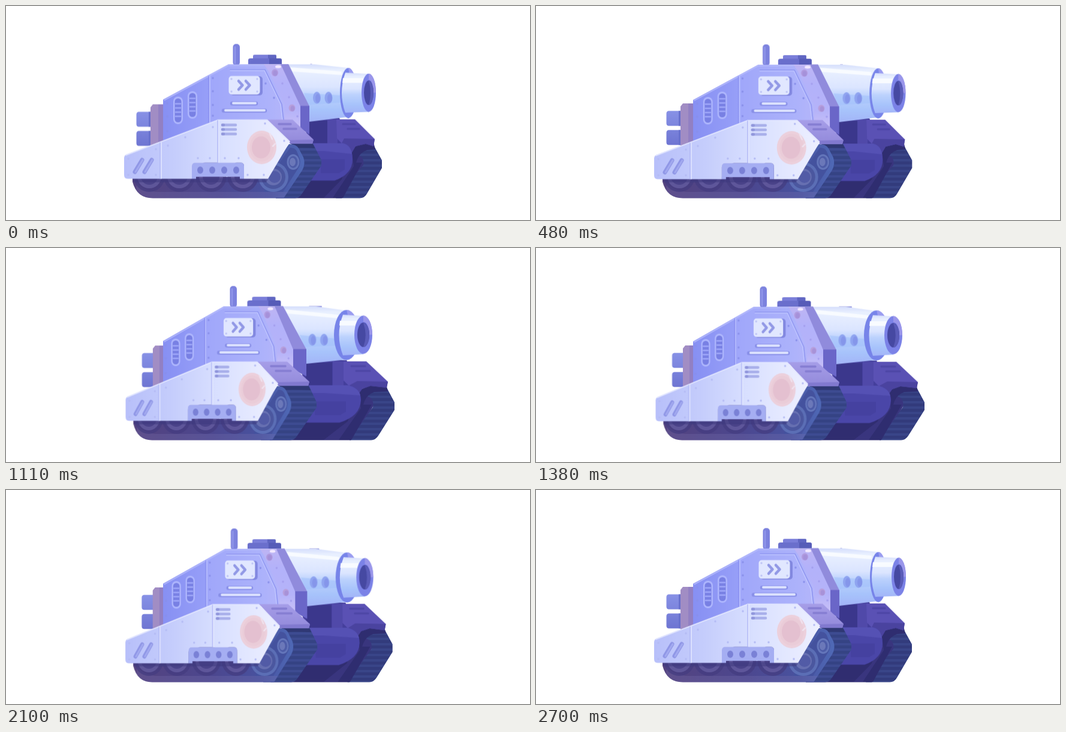
Recreate the animation shown at these times as an HTML page without scripts. Size 874x358 px, loop 2730 ms.

```html
<!DOCTYPE html>
<html lang="en">
<head>
<meta charset="utf-8">
<title>Tank</title>
<style>
html, body { margin: 0; width: 100%; height: 100%; overflow: hidden; background: #fff; }
svg { display: block; width: 874px; height: 358px; }

/* --a / --b are the two poses of a shape, --t is the turned pose of a group */
.morph { d: var(--a); animation: morph 2730ms cubic-bezier(.4, 0, .6, 1) var(--lag, 0s) infinite; }
.turn { animation: turn 2730ms cubic-bezier(.4, 0, .6, 1) var(--lag, 0s) infinite; }
.bob { animation: bob 182ms ease-in-out infinite; }
.shake { animation: shake 182ms ease-in-out infinite; }

/* the turret leads the turn, the exhausts trail it */
.lead { --lag: -70ms; }
.trail { --lag: -2660ms; }

@keyframes morph {
  0%, 15.4%, 97%, 100% { d: var(--a); }
  41%, 69.6% { d: var(--b); }
}
@keyframes turn {
  0%, 15.4%, 97%, 100% { transform: none; }
  41%, 69.6% { transform: var(--t); }
}
@keyframes bob {
  0%, 100% { transform: translateY(-.5px); }
  50% { transform: translateY(.4px); }
}
@keyframes shake {
  0%, 100% { transform: translateY(1.5px); }
  18% { transform: translateY(-.5px); }
  60% { transform: translateY(0); }
  88% { transform: translateY(-1px); }
}
.side { --t: translateX(18.5px) scaleX(.919); }
.line { fill: none; stroke-linecap: round; stroke-linejoin: round; }
</style>
</head>
<body>
<svg viewBox="0 0 874 358">
<defs>
  <linearGradient id="hull">
    <stop offset="0" stop-color="#8790f3"/><stop offset=".33" stop-color="#979ff8"/>
    <stop offset=".34" stop-color="#a0a7fa"/><stop offset=".75" stop-color="#acb2fb"/>
    <stop offset="1" stop-color="#bbb8fa"/>
  </linearGradient>
  <linearGradient id="skirt">
    <stop offset="0" stop-color="#b8c0fa"/><stop offset=".3" stop-color="#c5cdfc"/>
    <stop offset=".6" stop-color="#d9e0ff"/><stop offset="1" stop-color="#eef0ff"/>
  </linearGradient>
  <linearGradient id="track">
    <stop offset="0" stop-color="#54437f"/><stop offset=".5" stop-color="#4c478f"/>
    <stop offset=".8" stop-color="#48529f"/><stop offset="1" stop-color="#4f69b6"/>
  </linearGradient>
  <linearGradient id="barrel" x2="0" y2="1">
    <stop offset="0" stop-color="#d6dffc"/><stop offset=".1" stop-color="#e9f0ff"/>
    <stop offset=".4" stop-color="#dbe5ff"/><stop offset=".55" stop-color="#bcd2fd"/>
    <stop offset=".8" stop-color="#a7c3fb"/><stop offset="1" stop-color="#a3b5f8"/>
  </linearGradient>
  <linearGradient id="facet" x2="0" y2="1">
    <stop offset="0" stop-color="#beb5f4"/><stop offset=".3" stop-color="#b3b2fa"/>
    <stop offset=".7" stop-color="#b5b3f9"/><stop offset="1" stop-color="#cbc2f7"/>
  </linearGradient>
  <linearGradient id="fender" x2="0" y2="1">
    <stop offset="0" stop-color="#a69ee8"/><stop offset="1" stop-color="#9289da"/>
  </linearGradient>
  <linearGradient id="pipe" x2="0" y2="1">
    <stop offset="0" stop-color="#8791e6"/><stop offset="1" stop-color="#6e75d2"/>
  </linearGradient>
  <pattern id="tread" width="9" height="9" patternUnits="userSpaceOnUse">
    <path fill="#354384" d="M0 0h9v9H0z"/><path fill="#3d4b91" d="M0 4h9v4H0z"/>
  </pattern>
  <pattern id="farTread" width="9" height="9" patternUnits="userSpaceOnUse">
    <path fill="#323b7c" d="M0 0h9v9H0z"/><path fill="#394588" d="M0 4h9v4H0z"/>
  </pattern>
  <g id="wheel">
    <circle r="26" fill="#453c80" fill-opacity=".75"/>
    <circle r="20" fill="#665ea2" fill-opacity=".75"/>
    <circle r="14" fill="#4a4389"/>
  </g>
  <g id="grille">
    <rect x="-8" y="-23" width="16" height="46" rx="8" fill="#aeb6fd"/>
    <rect x="-5.5" y="-20" width="11" height="40" rx="5.5" fill="#7880e4"/>
    <path class="line" stroke="#a0a8fa" stroke-width="2.5" d="M-4-11h8M-4-4h8M-4 3h8M-4 10h8"/>
  </g>
</defs>

<!-- far track -->
<path class="morph" fill="#302d70" style="--a:path('M450 240H590V300L560 321.500H450Z');--b:path('M440 240H600V300L575 321.500H440Z')"/>
<path class="morph" fill="#39357e" style="--a:path('M572 252Q580 228 601 228L603 262L566 321H530L560 290Z');--b:path('M584 252Q594 228 616 228L614 262L580 321H530L570 290Z')"/>
<path class="morph" fill="url(#farTread)" style="--a:path('M582 250Q588 229 600 229H611L627 258V271L602 314Q598 321.500 590 321.500H550L596 266Q598 248 582 250Z');--b:path('M594 248Q600 228 612 228H632L648 258V271L621 314Q616 321.500 609 321.500H573L612 266Q615 246 594 248Z')"/>
<path class="morph" fill="#2f2d70" style="--a:path('M576 238L600 228H613L616 240L602 241Q588 246 584 262L594 262L562 321H545L580 268Z');--b:path('M588 238L610 228H634L637 240L614 241Q600 246 596 262L610 262L576 321H555L592 268Z')"/>

<!-- front lower hull -->
<g class="bob">
  <path class="morph" fill="#443f9c" style="--a:path('M496 188H556L580 236H505Z');--b:path('M490 188H568L594 236H498Z')"/>
  <path class="morph" fill="#3b378c" style="--a:path('M506 192H536V232H506Z');--b:path('M500 192H544V232H500Z')"/>
  <path class="morph" fill="#5049a9" style="--a:path('M536 190H553V232H536Z');--b:path('M545 190H563V232H545Z')"/>
  <path class="morph" fill="#5a51b4" style="--a:path('M551 190H582L615 223L613 235L600 231L583 235L576 247L552 222Z');--b:path('M563 190H601L637 224L635 234L608 231L594 236L587 246L563 222Z')"/>
  <path class="morph" fill="#4a439f" style="--a:path('M564 222L615 223L613 235L600 231L583 235L576 247L560 230Z');--b:path('M586 223L637 224L635 234L608 231L594 236L587 246L573 230Z')"/>
  <path class="morph line" stroke="#4d46a5" stroke-width="3" style="--a:path('M562 198H582M570 206H589');--b:path('M576 198H599M584 206H607')"/>
  <path class="morph" fill="#4a46a8" style="--a:path('M500 230H562Q578 233 578 257Q578 282 548 292.500H500Z');--b:path('M490 230H570Q592 234 592 255Q591 282 556 292.500H490Z')"/>
  <path class="morph" fill="#5551b4" style="--a:path('M500 230H562Q575 233 577 248L530 243H500Z');--b:path('M490 230H570Q588 234 591 247L530 243H490Z')"/>
  <path class="morph" fill="#4541a0" style="--a:path('M525 257H565V274L555 280H525Z');--b:path('M515 257H567V274L557 280H515Z')"/>

  <!-- barrel -->
  <g class="lead">
    <path class="morph line" stroke="#8588dc" stroke-width="2" style="--a:path('M508 98.500H510');--b:path('M506 98.500H526')"/>
    <path class="morph" fill="url(#barrel)" style="--a:path('M460 98H515L571 104V186L506 194L490 170Z');--b:path('M450 98H517L568 105V187L501 194L484 170Z')"/>
    <path class="morph" fill="#f8fbff" style="--a:path('M474 103L560 110V116L478 110Z');--b:path('M466 103L554 112V118L470 110Z')"/>
    <path class="morph" fill="#9fc0fb" fill-opacity=".5" style="--a:path('M497 146L558 150V162L503 166Z');--b:path('M490 146L550 152V164L498 166Z')"/>
    <g class="turn" style="--t:translateX(-7.5px)">
      <ellipse cx="518.500" cy="154" rx="6.500" ry="10" fill="#8fa4f0"/><ellipse cx="538" cy="154" rx="6.500" ry="10" fill="#8fa4f0"/>
      <ellipse cx="520" cy="155" rx="4" ry="7.500" fill="#8596ea"/><ellipse cx="540" cy="155" rx="4" ry="7.500" fill="#8596ea"/>
    </g>
    <g class="turn" style="--t:translateX(-288.5px) scaleX(1.5)">
      <ellipse cx="571" cy="146" rx="14" ry="42" fill="#7784e9"/>
      <path fill="#9a9cf0" d="M571 104A14 42 0 0 1 583 124L574 124Z"/>
    </g>
    <path class="morph" fill="url(#barrel)" style="--a:path('M566 112Q554 146 566 179L605 177.500V114Z');--b:path('M562 112Q549 146 562 180L596 178V114Z')"/>
    <path class="morph" fill="#f8fbff" style="--a:path('M562 121H596V129H561Z');--b:path('M557 122H586V130H556Z')"/>
    <g class="turn" style="--t:translateX(-160.25px) scaleX(1.25)">
      <ellipse cx="605" cy="145.500" rx="12" ry="32" fill="#7b82e7"/>
      <path fill="#9a96ea" d="M605 113.500A12 32 0 0 1 617 145.500H613Q612 124 605 124Z"/>
      <ellipse cx="605" cy="145.500" rx="8" ry="20.500" fill="#4649a2"/>
      <path fill="#5a5cb8" d="M605 126A8 20 0 0 1 605 166Q611 146 605 126Z"/>
    </g>
  </g>
</g>

<!-- exhausts -->
<g class="shake trail">
  <g class="turn" style="--t:translateX(9.5px)">
    <path fill="url(#pipe)" d="M221 175.500H246V200.500H221Q217.500 200 217.500 196V180Q217.500 176 221 175.500ZM221 207.500H246V232.500H221Q217.500 232 217.500 228V212Q217.500 208 221 207.500Z"/>
    <path fill="#6870cc" d="M238 175.500H246V200.500H238ZM238 207.500H246V232.500H238Z"/>
  </g>
  <path class="morph" fill="#a18dc4" style="--a:path('M245 163H264V234H241V168Z');--b:path('M249 163H264V232H245V168Z')"/>
  <path class="morph" fill="#9280c3" style="--a:path('M254 163H264V232H254Z');--b:path('M256 163H264V230H256Z')"/>
</g>

<g class="bob lead">
  <!-- roof parts -->
  <g class="turn" style="--t:translateX(-5px)">
    <rect x="378.500" y="64" width="11.500" height="36" rx="5" fill="#7c82de"/>
    <path class="line" stroke="#9096ea" stroke-width="2.500" d="M382 69V96"/>
  </g>
  <g class="turn" style="--t:translateX(-1.5px)">
    <path fill="#7a7ed9" d="M412 88V84Q412 82 415 82H448Q451 82 451 84V88Z"/>
    <path fill="#6066c2" d="M437 82H448Q451 82 451 84V88H437Z"/>
    <path fill="#6a6fcc" d="M404 98V91Q404 88 408 88H456Q460 88 460 91V98Z"/>
    <path fill="#565cb8" d="M439 88H456Q460 88 460 91V98H439Z"/>
  </g>

  <!-- turret -->
  <path class="morph" fill="url(#hull)" style="--a:path('M262 157L371 98H458L491 165V210L436 194H353L262 232Z');--b:path('M262 156L363 98H448L479 165V210L424 194H341L262 232Z')"/>
  <path class="morph" fill="url(#facet)" style="--a:path('M430 98H459L492 166V208L465 194V165L437 108Z');--b:path('M421 98H449L480 166V206L452 194V165L427 108Z')"/>
  <path class="morph" fill="#908bdc" style="--a:path('M458 97.500H471L506 168H491Z');--b:path('M448 97.500H462L501 170H479Z')"/>
  <path class="morph" fill="#6a66c8" style="--a:path('M491 167.500H506V215L491 206Z');--b:path('M479 169.500H501V215L479 204Z')"/>
  <path class="morph line" stroke="#b4bafc" stroke-width="1.500" style="--a:path('M264 158L371 100H430');--b:path('M264 157L363 100H421')"/>
  <g class="turn" style="--t:translateX(11.5px) scaleX(.946)">
    <path class="line" stroke="#8c93ef" stroke-width="1.500" d="M338 118V196M374 107H432L460 165L463 192"/>
    <path class="line" stroke="#bfc5ff" stroke-width="1.500" d="M340 118V196M374 108.500H431L458 165L461 192"/>
    <use href="#grille" x="287" y="175"/><use href="#grille" x="311" y="166"/>
    <rect x="374" y="118" width="54" height="32" rx="5" fill="#8288e0"/>
    <rect x="371.500" y="117.500" width="52" height="31" rx="5" fill="#e1e7ff"/>
    <path class="line" stroke="#9299e6" stroke-width="4.500" d="M388 126L394.500 133L388 140M400 126L406.500 133L400 140"/>
    <path class="line" stroke="#c0c6f6" stroke-width="3.500" d="M376 122.500h0M419 122.500h0M376 143.500h0M419 143.500h0"/>
    <path class="line" stroke="#8990e8" stroke-width="6.500" d="M377 163.500H417M363 175.500H432"/>
    <path class="line" stroke="#dce2ff" stroke-width="4" d="M379 163H416M366 175H431"/>
    <path class="line" stroke="#8990ea" stroke-width="3.500" d="M269 163h0M269 185h0M269 210h0M345 121h0M345 143h0M345 166h0M345 184h0M433 130h0M447 154h0"/>
    <ellipse cx="448.500" cy="112" rx="5.500" ry="6" fill="#b09ade"/><ellipse cx="449" cy="113" rx="3.500" ry="4.500" fill="#a591da"/>
    <ellipse cx="477" cy="171" rx="5.500" ry="6" fill="#b79fdc"/><ellipse cx="478" cy="172" rx="3.500" ry="4.500" fill="#a892d8"/>
    <path class="line" stroke="#a49fee" stroke-width="3.500" d="M461 130h0M472 153h0M486 185h0"/>
    <ellipse cx="454" cy="102" rx="5" ry="2.500" fill="#f2e9ff"/>
  </g>
</g>

<!-- near track -->
<path class="morph" fill="url(#tread)" style="--a:path('M474 230H512L526 258V267L493 315Q489 321.500 482 321.500H450L496 262L484 236Z');--b:path('M454 230H505L518 258V267L485 315Q481 321.500 474 321.500H425L475 262L464 236Z')"/>
<path class="morph" fill="#2f3874" style="--a:path('M474 229H511L515 238Q488 236 484 238Z');--b:path('M454 229H504L508 238Q470 236 464 238Z')"/>
<g class="turn side">
  <path fill="url(#track)" d="M211 286V294Q218 321.500 245 321.500H463L494 275Q500 264 496 253L488 238Q484 231 472 231L430 286Z"/>
  <path fill="#44529e" d="M474 237Q482 237 485 243L490 256Q492 264 487 272L462 311H430L437 289Z"/>
  <path fill="#7d75b0" fill-opacity=".25" d="M217 308Q226 321.500 245 321.500H463L470 311H250Q228 308 218 296Z"/>
  <use href="#wheel" x="239" y="285"/><use href="#wheel" x="289" y="285"/>
  <use href="#wheel" x="342" y="285"/><use href="#wheel" x="395" y="285"/>
  <circle cx="446" cy="286" r="25" fill="#6377bd" fill-opacity=".75"/>
  <circle cx="446" cy="286" r="20" fill="#4b579f"/>
  <circle cx="446" cy="286" r="14" fill="#666fb1"/><circle cx="448" cy="286" r="10" fill="#525ba6"/>
  <ellipse cx="479" cy="261" rx="10.500" ry="13" fill="#6375ba"/><ellipse cx="479" cy="261" rx="7.500" ry="10" fill="#4d5ca7"/>
  <ellipse cx="478" cy="261" rx="5" ry="7" fill="#6b78b9"/>
  <path fill="#3d387e" fill-opacity=".5" d="M211 288H438L434 295H213Z"/>
</g>

<!-- skirt -->
<g class="bob">
  <path class="morph" fill="url(#fender)" style="--a:path('M434 190.500H478L513 224L511 231H474L470 226Z');--b:path('M420 190.500H469L506 224L504 231H454L450 226Z')"/>
  <path class="morph" fill="#8179cf" style="--a:path('M472 225L513 224L511 231H474Z');--b:path('M452 225L506 224L504 231H454Z')"/>
  <path class="morph line" stroke="#857dd2" stroke-width="3.500" style="--a:path('M455 198H475M463 206H484');--b:path('M442 198H466M450 206H475')"/>
  <g class="turn side">
    <path fill="url(#skirt)" d="M197 254Q197 251 200 249L353 190.500H436L474 227L437 289.500H397V268Q397 262.500 391 262.500H316Q310 262.500 310 268V289.500H203Q197 289.500 197 283Z"/>
    <path fill="#a5aef2" d="M310 289.500V268Q310 262.500 316 262.500H391Q397 262.500 397 268V289.500H390V286H317V289.500Z"/>
    <path class="line" stroke="#e4e8ff" stroke-width="1.500" d="M200 250L353 191.500H436L472 227M259 229V289M355 192V262"/>
    <path class="line" stroke="#b4bbf6" stroke-width="1.500" d="M257 229V289M353 192V262"/>
    <path class="line" stroke="#8f96e6" stroke-width="7" d="M215 278L227 258M231 278L243 258"/>
    <path class="line" stroke="#a3aaf0" stroke-width="3" d="M216 278L228 258M232 278L244 258"/>
    <path class="line" stroke="#a8afea" stroke-width="4.500" d="M361 199.500H383M361 207H383M361 214.500H383"/>
    <path class="line" stroke="#9096dc" stroke-width="4.500" d="M361 199.500h2M361 207h2M361 214.500h2"/>
    <g fill="#7a81d6">
      <ellipse cx="324" cy="275" rx="5" ry="6"/><ellipse cx="344" cy="275" rx="5" ry="6"/>
      <ellipse cx="364" cy="275" rx="5" ry="6"/><ellipse cx="384" cy="275" rx="5" ry="6"/>
    </g>
    <ellipse cx="426.500" cy="237" rx="24.500" ry="28" fill="#ecd0dc"/>
    <ellipse cx="426.500" cy="237" rx="20" ry="23.500" fill="#eaccd8"/>
    <ellipse cx="425.500" cy="237" rx="15.500" ry="18.500" fill="#e4c0d0"/>
    <path class="line" stroke="#f0e2ee" stroke-width="2.500" d="M440 214L444 223M449 231L445 235"/>
    <path class="line" stroke="#b4bbf4" stroke-width="3.500" d="M204 256h0M204 283h0M250 240h0M250 283h0M270 234h0M299 220h0M345 203h0M320 255h0M340 255h0M365 255h0M388 255h0M403 283h0M430 283h0M464 226h0M432 197h0"/>
  </g>
</g>
</svg>
</body>
</html>
```
